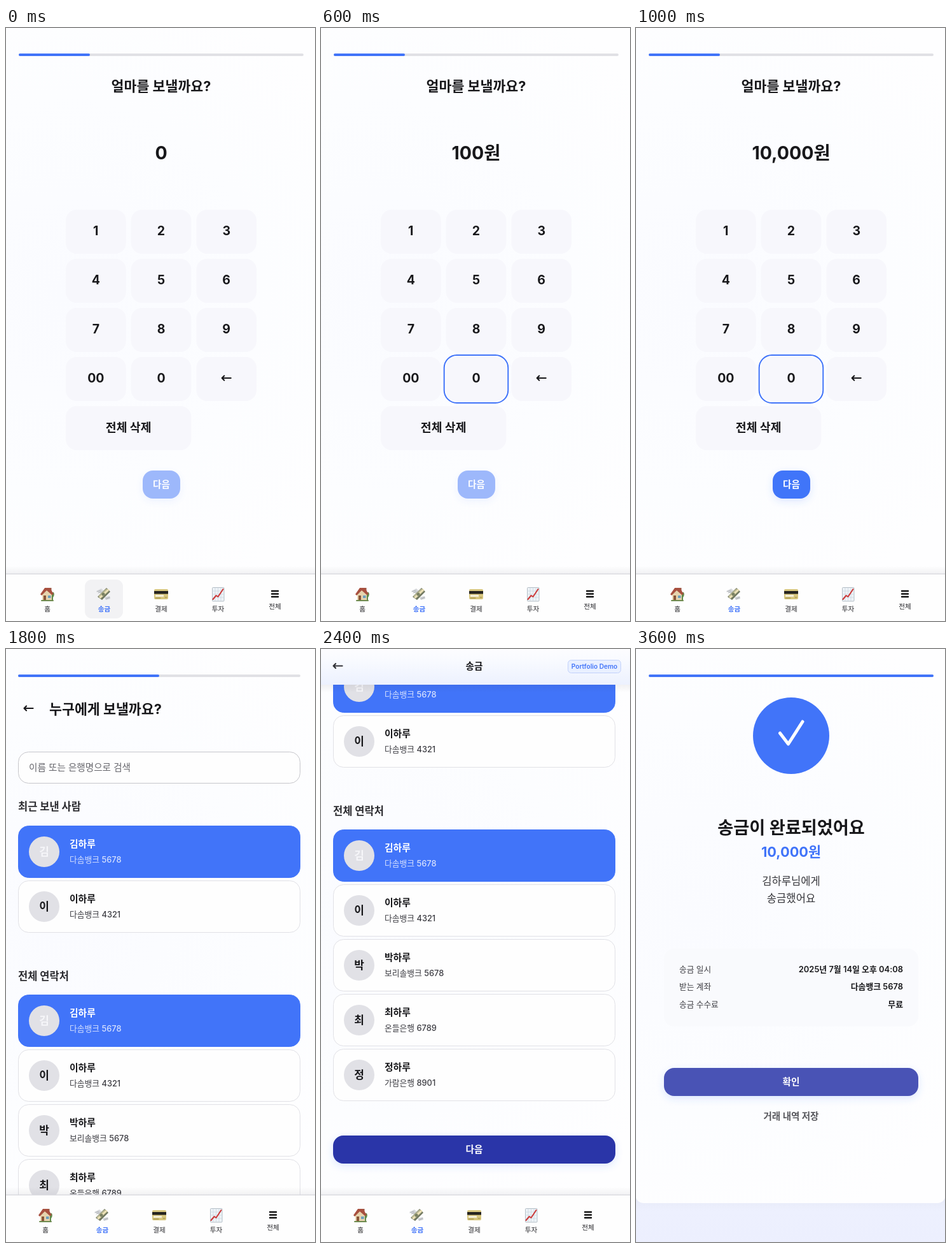
Write an HTML page that moves like this. It is 486 px wide and 930 px high and loops after 4.2 s.

```html
<!DOCTYPE html>
<html lang="ko">
<head>
<meta charset="utf-8">
<title>송금</title>
<style>
  html, body { margin: 0; width: 100%; height: 100%; overflow: hidden; background: #fff; }
  svg { display: block; width: 486px; height: 930px; }
  text { font-family: Inter, "Noto Sans CJK KR", "Noto Sans CJK", sans-serif; white-space: pre; }
</style>
</head>
<body>
<svg id="stage" viewBox="0 0 486 930">
  <defs>
    <radialGradient id="page" gradientUnits="userSpaceOnUse" cx="90" cy="420" r="520">
      <stop offset="0" stop-color="#fafbff"/><stop offset=".6" stop-color="#fcfdff"/><stop offset="1" stop-color="#fefeff"/>
    </radialGradient>
    <linearGradient id="lift" x2="0" y2="1">
      <stop offset="0" stop-color="#000" stop-opacity="0"/><stop offset="1" stop-color="#223" stop-opacity=".055"/>
    </linearGradient>
    <linearGradient id="fall" x2="0" y2="1">
      <stop offset="0" stop-color="#223" stop-opacity=".06"/><stop offset="1" stop-color="#000" stop-opacity="0"/>
    </linearGradient>
    <linearGradient id="glass" x2="0" y2="1">
      <stop offset="0" stop-color="#fdfdff"/><stop offset=".35" stop-color="#f8faff"/><stop offset="1" stop-color="#ecf1fe"/>
    </linearGradient>
    <linearGradient id="floor" x2="0" y2="1">
      <stop offset="0" stop-color="#e6e9f6"/><stop offset=".35" stop-color="#edf0fe"/><stop offset="1" stop-color="#eceffe"/>
    </linearGradient>
    <filter id="glow" x="-30%" y="-60%" width="160%" height="240%">
      <feDropShadow dx="0" dy="4" stdDeviation="6" flood-color="#4174f9" flood-opacity=".16"/>
    </filter>
  </defs>
</svg>
<script>
const BLUE = '#4174f9', INK = '#18181b', SOFT = '#3d3d43', LINE = '#e1e1e6';
const stage = document.getElementById('stage');

function el(parent, tag, attrs = {}) {
  const node = document.createElementNS('http://www.w3.org/2000/svg', tag);
  for (const key in attrs) node.setAttribute(key, attrs[key]);
  return parent.appendChild(node);
}
const group = (p, x = 0, y = 0) => el(p, 'g', { transform: `translate(${x} ${y})` });
const box = (p, x, y, width, height, rx, fill, more) =>
  el(p, 'rect', { x, y, width, height, rx, fill, ...more });
const outlined = (p, x, y, w, h, fill, stroke) =>
  box(p, x + .5, y + .5, w - 1, h - 1, 16, fill, { stroke });
const path = (p, d, stroke, width, more) =>
  el(p, 'path', { d, fill: 'none', stroke, 'stroke-width': width, 'stroke-linecap': 'round', 'stroke-linejoin': 'round', ...more });
const shape = (p, d, fill) => el(p, 'path', { d, fill });

// cy is the optical middle of the line of text
function label(p, str, x, cy, size, fill = INK, weight = 700, anchor = 'start') {
  const node = el(p, 'text', { x, y: cy + size * .37, 'font-size': size, fill, 'font-weight': weight, 'text-anchor': anchor });
  node.textContent = str;
  return node;
}
const centered = (p, str, x, cy, size, fill, weight) => label(p, str, x, cy, size, fill, weight, 'middle');
const rightAligned = (p, str, x, cy, size) => label(p, str, x, cy, size, INK, 600, 'end');

const arrow = (p, x, y, color = INK) =>
  path(p, `M${x + 7} ${y}H${x - 7}M${x - 3.5} ${y - 3.5}L${x - 7} ${y}L${x - 3.5} ${y + 3.5}`, color, 2.2);

function progress(p, x, width, part) {
  box(p, x, 40, width, 4, 2, '#e1e1e5');
  box(p, x, 40, width * part, 4, 2, BLUE);
}
function button(p, str, x, y, width, fill, more) {
  const g = el(p, 'g', more);
  box(g, x, y, width, 44, 16, fill, { filter: 'url(#glow)' });
  centered(g, str, x + width / 2, y + 22, 14.6, '#fff');
  return g;
}
function screen() {
  const g = group(stage);
  box(g, 0, 0, 486, 930, 0, 'url(#page)');
  return g;
}

// Icons are drawn around their own centre
const icons = {
  home(g) {
    shape(g, 'M4 -3h6q2 4 -1 8v5h-5z', '#5f8a4a');
    shape(g, 'M-8 -1L-1 -7L7 0V10H-8z', '#e6d3ad');
    box(g, 3, -10, 3.5, 7, 0, '#9c5a48');
    shape(g, 'M-11 0L-4 -10H4L10 0L7 1L-1 -6L-9 2z', '#a8503f');
    box(g, -6, 2, 4, 8, 0, '#8a5638');
    box(g, 1, 2, 4.5, 4, 0, '#6d9fbd');
    box(g, -10, 9, 20, 2, 1, '#6f8b50');
  },
  money(g) {
    shape(g, 'M-11 -5L-3 -9L3 -3L-2 0z', '#d7d9dc');
    shape(g, 'M2 5L10 3L11 7L4 9z', '#cfd1d4');
    shape(g, 'M-9 4L5 -10L11 -4L-2 9z', '#70775f');
    shape(g, 'M-8 3L5 -9L9 -5L-4 7z', '#b9b893');
    path(g, 'M-5 5L8 -7', '#efe3b8', 2.5);
    el(g, 'circle', { r: 2.6, fill: '#7c8264' });
    path(g, 'M-10 -4L-4 -6M-8 -2L-3 -4M5 7L10 5', '#a3a6aa', .8);
  },
  card(g) {
    box(g, -11, -8, 22, 16, 2, '#d8c77f');
    box(g, -11, -5, 22, 4.5, 0, '#25231f');
    box(g, -9, 1, 13, 3, 0, '#f4efd9');
    path(g, 'M-9 6H-1M6 5H9', '#95843f', 1);
  },
  chart(g) {
    box(g, -9, -10.5, 18.5, 21.5, 1, '#eef3f7', { stroke: '#b4bec6' });
    path(g, 'M-4.5 -10V10M0 -10V10M4.5 -10V10M-9 -5H9M-9 0H9M-9 5H9', '#c8d5df', .7);
    path(g, 'M-8 8L-3 2L0 4L8 -8', '#cc3939', 2);
  },
  menu(g) {
    path(g, 'M-5 -4.5H5M-5 0H5M-5 4.5H5', '#111', 2.4);
  }
};

function navBar(p, shift = 0) {
  box(p, 0, 844, 486, 12, 0, 'url(#lift)');
  box(p, 0, 856, 486, 74, 0, '#fefefe');
  box(p, 0, 855.5, 486, 1.5, 0, '#dcdce1');
  const g = group(p, shift);
  const hover = box(g, 124, 865, 60, 61, 11, '#f2f2f4');
  [['home', '홈'], ['money', '송금'], ['card', '결제'], ['chart', '투자'], ['menu', '전체']].forEach(([icon, name], i) => {
    const x = 65 + i * 89.5, last = icon === 'menu', active = icon === 'money';
    icons[icon](group(g, x - (active ? 1.5 : 0), last ? 887.5 : 888));
    centered(g, name, x, last ? 907.5 : 911.5, 10.6, active ? BLUE : '#27272b', active ? 700 : 500);
  });
  return hover;
}

// Amount entry
const entry = screen();
progress(entry, 20, 448, .25);
centered(entry, '얼마를 보낼까요?', 244, 91, 21.7);
const amount = centered(entry, '0', 244, 195, 28.5);
const KEY_STEP = 102.67;
['1', '2', '3', '4', '5', '6', '7', '8', '9', '00', '0', '←', '전체 삭제'].forEach((key, i) => {
  const wide = i === 12, width = wide ? 197.33 : 94.67;
  const x = 94 + i % 3 * KEY_STEP, y = 285 + Math.floor(i / 3) * 77, mid = x + width / 2;
  box(entry, x, y, width, 69, 17, '#f7f7fc');
  if (key === '←') arrow(entry, mid, y + 264 - 231 + 31 - 31);
  else centered(entry, key, mid, y + 33, wide ? 18.3 : 19.5);
});
const ring = box(entry, 0, 0, 100.6, 75, 20, 'none', { stroke: BLUE, 'stroke-width': 2 });
const next = button(entry, '다음', 215, 694, 59, BLUE);
const entryHover = navBar(entry);

// Recipient list
const BANK = '다솜뱅크';
const people = [
  ['김하루', BANK + ' 5678'], ['이하루', BANK + ' 4321'], ['박하루', '보리솔뱅크 5678'],
  ['최하루', '온들은행 6789'], ['정하루', '가람은행 8901']
];
function contact(p, [name, account], y, look) {
  const chosen = look === 'chosen', hover = look === 'hover';
  const g = group(p, 0, y);
  outlined(g, 19, 0, 444, 82, chosen ? BLUE : hover ? '#f5f8fd' : '#fefefe', chosen || hover ? BLUE : LINE);
  el(g, 'circle', { cx: 60, cy: 41, r: 24, fill: '#e1e1e6' });
  centered(g, name[0], 60, 40.5, 17, chosen ? '#f6f6f9' : INK);
  label(g, name, 100, 28.5, 14.8, chosen ? '#fff' : INK);
  label(g, account, 100, 53.3, 12.8, chosen ? '#d6e1fe' : SOFT, 500);
}
function recipients(firstLook, scroll = 0) {
  const view = screen(), g = group(view, 0, -scroll);
  const chosen = firstLook === 'chosen' ? 'chosen' : '';
  progress(g, 19, 444, .5);
  arrow(g, 35.5, 93);
  label(g, '누구에게 보낼까요?', 68, 94, 21.7);
  outlined(g, 19, 161, 444, 50, '#fefefe', '#c6c6cb');
  label(g, '이름 또는 은행명으로 검색', 36, 186, 14.6, '#66666c', 400);
  label(g, '최근 보낸 사람', 19, 247, 16.5, '#2c2c30');
  people.slice(0, 2).forEach((who, i) => contact(g, who, 277 + i * 86, i ? '' : firstLook));
  label(g, '전체 연락처', 19, 513, 16.5, '#2c2c30');
  people.forEach((who, i) => contact(g, who, 542 + i * 86, i ? '' : chosen));
  button(g, '다음', 19, 1022, 444, '#2a35a8');
  if (scroll) {
    box(view, 0, 56, 486, 12, 0, 'url(#fall)');
    box(view, 0, 0, 486, 56, 0, 'url(#glass)');
    arrow(view, 26.5, 26.5, '#333338');
    centered(view, '송금', 241, 27, 14.6);
    box(view, 388.5, 17.5, 83, 20, 5, '#e9f0ff', { stroke: '#c2d1fb' });
    centered(view, 'Portfolio Demo', 430, 27.3, 10.1, BLUE, 600);
  }
  navBar(view, -3).remove();
  return view;
}
const hovering = recipients('hover');
const chosen = recipients('chosen');
const scrolled = recipients('chosen', 259);

// Confirmation
const confirmView = screen();
progress(confirmView, 20, 448, .75);
arrow(confirmView, 36.5, 93);
label(confirmView, '송금 정보를 확인해주세요', 69, 94, 21.6);
box(confirmView, 20, 161, 448, 267, 20, '#f7f8fb');
[['보낼 금액', 202, '10,000원', 232, 21.8, BLUE], ['받는 사람', 283, '김하루', 309, 16.6, INK],
 ['받는 계좌', 356, BANK + ' 100012345678', 382, 16.6, INK]].forEach(([head, headY, value, y, size, color]) => {
  label(confirmView, head, 52, headY, 12.7, SOFT, 500);
  label(confirmView, value, 52, y, size, color);
});
outlined(confirmView, 20, 484, 448, 53, '#fefefe', LINE);
label(confirmView, '송금 수수료', 37, 510, 12.7, SOFT, 500);
rightAligned(confirmView, '무료', 451, 510, 13);
centered(confirmView, '송금 후에는 취소할 수 없습니다.', 244, 618, 12.6, SOFT, 500);
centered(confirmView, '받는 분의 정보를 다시 한번 확인해주세요.', 244, 638, 12.6, SOFT, 500);
button(confirmView, '10,000원 보내기', 20, 696, 448, BLUE);
navBar(confirmView).remove();

// Done
const done = group(stage);
box(done, 0, 0, 486, 930, 0, '#eceffe');
box(done, 0, 855, 486, 75, 0, 'url(#floor)');
box(done, -1, -20, 488, 889, 13, 'url(#page)');
progress(done, 20, 448, 1);
el(done, 'circle', { cx: 244, cy: 136, r: 60, fill: BLUE });
path(done, 'M226.5 132L239.5 149L262 114', '#fff', 5);
centered(done, '송금이 완료되었어요', 244, 280, 27.2);
centered(done, '10,000원', 244, 318, 21.8, BLUE);
centered(done, '김하루님에게', 244, 364, 16.6, '#36363b', 500);
centered(done, '송금했어요', 244, 391, 16.6, '#36363b', 500);
box(done, 44, 470, 400, 122, 16, '#f9fafd');
[['송금 일시', '2025년 7월 14일 오후 04:08'], ['받는 계좌', BANK + ' 5678'], ['송금 수수료', '무료']].forEach(([head, value], i) => {
  label(done, head, 68, 502 + i * 27.6, 12.7, SOFT, 500);
  rightAligned(done, value, 420, 502 + i * 27.6, 12.9);
});
button(done, '확인', 44, 657, 400, '#4a52b5');
centered(done, '거래 내역 저장', 244, 733, 14.5, '#57575c');

// Timeline: start time, visible screen, typed amount
const LOOP = 4200;
const steps = [
  [0, entry, 0], [200, entry, 1], [400, entry, 10], [600, entry, 100], [800, entry, 1000], [1000, entry, 10000],
  [1200, hovering], [1800, chosen], [2400, scrolled], [3000, confirmView], [3600, done]
];
const screens = [...new Set(steps.map(step => step[1]))];
let current;

function show(step) {
  const [, view, won] = step;
  screens.forEach(s => s.setAttribute('display', s === view ? 'inline' : 'none'));
  if (view !== entry) return;
  amount.textContent = won ? won.toLocaleString('en-US') + '원' : '0';
  const onOne = won === 1;
  ring.setAttribute('display', won ? 'inline' : 'none');
  ring.setAttribute('x', (onOne ? 94 : 94 + KEY_STEP) - 3);
  ring.setAttribute('y', (onOne ? 285 : 516) - 3);
  entryHover.setAttribute('display', won ? 'none' : 'inline');
  next.setAttribute('opacity', won < 1000 ? .5 : 1);
}
const start = performance.now();
function tick() {
  const time = (performance.now() - start) % LOOP;
  const step = steps.findLast(s => s[0] <= time);
  if (step !== current) show(current = step);
  requestAnimationFrame(tick);
}
tick();
</script>
</body>
</html>
```
